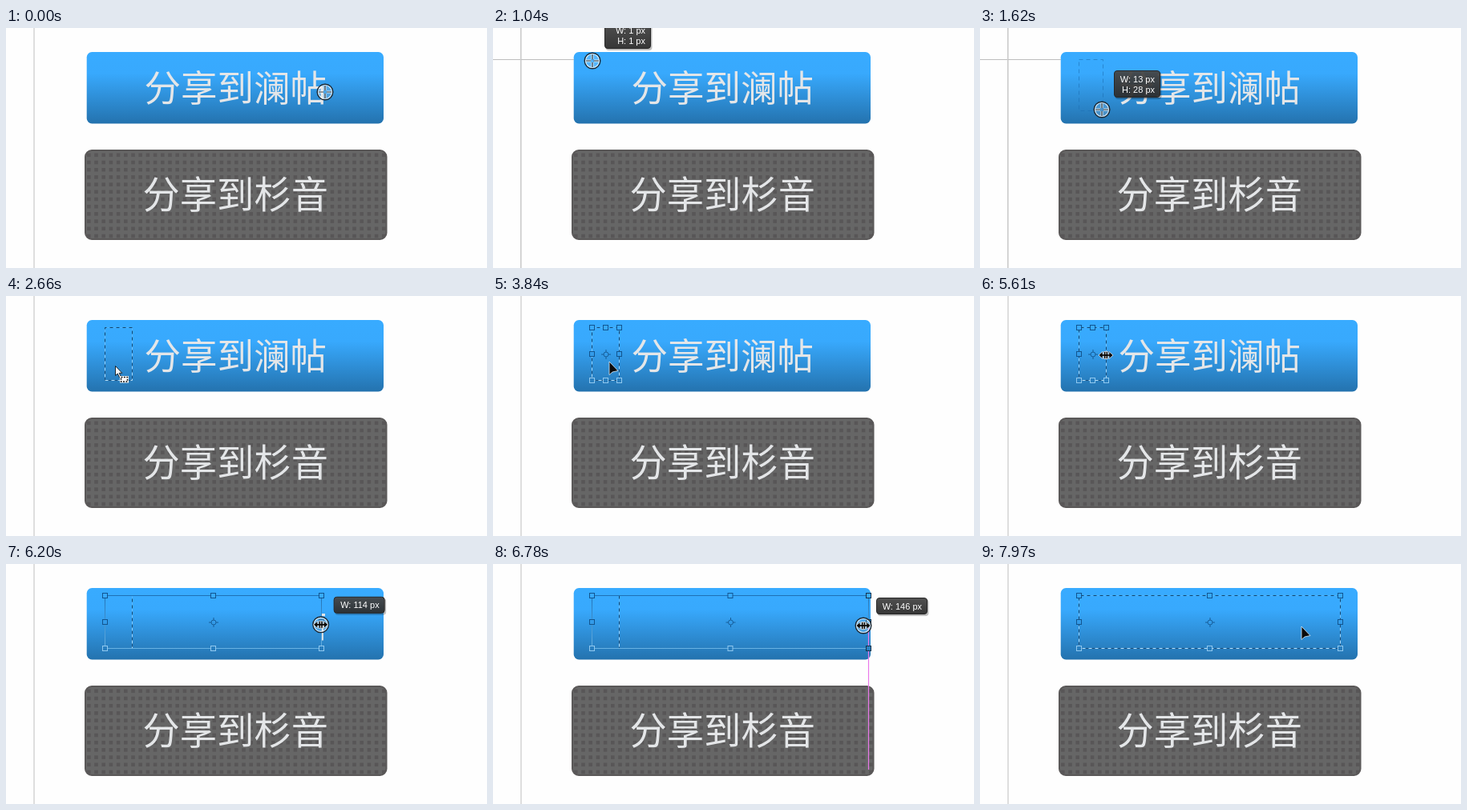
An HTML page for the animation above (8 s loop, 600 px wide and 300 px high).

```html
<!DOCTYPE html>
<html lang="zh">
<head>
<meta charset="utf-8">
<title>Button edit</title>
<style>
html, body { margin: 0; width: 100%; height: 100%; overflow: hidden; background: #fefefe; }
svg { display: block; width: 600px; height: 300px; }
.label { font-family: "Noto Sans CJK SC", "Noto Sans CJK", sans-serif; fill: #e4e6e8; }
.tip { font: 11px "Liberation Sans", Arial, sans-serif; fill: #fff; }
</style>
</head>
<body>
<svg viewBox="0 0 600 300" xmlns="http://www.w3.org/2000/svg">
  <defs>
    <linearGradient id="blue" gradientUnits="userSpaceOnUse" x1="0" y1="30" x2="0" y2="119">
      <stop offset="0" stop-color="#38abff"/>
      <stop offset=".3" stop-color="#38a9fd"/>
      <stop offset="1" stop-color="#2473af"/>
    </linearGradient>
    <linearGradient id="antDark" gradientUnits="userSpaceOnUse" x1="0" y1="39" x2="0" y2="106">
      <stop offset="0" stop-color="#14466f"/>
      <stop offset="1" stop-color="#1d507c"/>
    </linearGradient>
    <linearGradient id="antLight" gradientUnits="userSpaceOnUse" x1="0" y1="39" x2="0" y2="106">
      <stop offset="0" stop-color="#4fb3fb"/>
      <stop offset="1" stop-color="#b5dffa"/>
    </linearGradient>
    <linearGradient id="edge" gradientUnits="userSpaceOnUse" x1="0" y1="39" x2="0" y2="106">
      <stop offset="0" stop-color="#1f70b4"/>
      <stop offset="1" stop-color="#69b3e4"/>
    </linearGradient>
    <linearGradient id="tipFill" x1="0" y1="0" x2="0" y2="1">
      <stop offset="0" stop-color="#484848"/>
      <stop offset="1" stop-color="#2c2c2c"/>
    </linearGradient>
    <pattern id="dots" patternUnits="userSpaceOnUse" x="101" y="156.5" width="9.2" height="9.2">
      <rect width="9.2" height="9.2" fill="#666"/>
      <rect width="4.6" height="4.6" fill="#585657"/>
    </pattern>
  </defs>
  <rect width="600" height="300" fill="#fefefe"/>
  <rect x="34" width="2" height="300" fill="#dedede"/>
  <rect x="100.7" y="30" width="370.3" height="89.5" rx="6.5" fill="url(#blue)"/>
  <text class="label" x="172.5" y="91.5" font-size="45.5">分享到澜帖</text>
  <rect x="99" y="153" width="375.5" height="111" rx="8" fill="url(#dots)" stroke="#5a5858" stroke-width="2"/>
  <text class="label" x="170.5" y="225" font-size="46.3">分享到杉音</text>
  <g id="live"></g>
</svg>
<script>
const LOOP = 8000, STEP = 147.4;
const L = 123.5, T = 39.5, B = 105.5, SEL_R = 157.5;
const live = document.getElementById('live');

// pointer path: step, x, y
const PATH = [
  [0, 398, 80], [5, 124, 43], [7, 124, 41], [11, 152, 102], [14, 156, 104],
  [15, 156, 104], [18, 136, 87], [22, 136, 87], [26, 145, 82], [30, 157, 74],
  [38, 157, 74], [43, 420, 76], [46, 462, 77], [47, 462, 77], [49, 454, 77],
  [50, 454, 77], [54, 401, 78]
];

function pointer(k) {
  let i = 0;
  while (i < PATH.length - 2 && PATH[i + 1][0] <= k) i++;
  const [k0, x0, y0] = PATH[i], [k1, x1, y1] = PATH[i + 1];
  const u = Math.min(1, (k - k0) / (k1 - k0)), e = u * u * (3 - 2 * u);
  return [x0 + (x1 - x0) * e, y0 + (y1 - y0) * e];
}

const line = (d, stroke, w = 1, more = '') =>
  `<path d="${d}" fill="none" stroke="${stroke}" stroke-width="${w}" ${more}/>`;
const box = (r, b) => `M${L} ${T}H${r}V${b}H${L}Z`;
const at = (x, y, s) => `<g transform="translate(${x} ${y})">${s}</g>`;

function ants(r, b, k) {
  const d = box(r, b);
  return line(d, 'url(#antLight)') +
    line(d, 'url(#antDark)', 1, `stroke-dasharray="4 4" stroke-dashoffset="${-(k * 3 % 8)}"`);
}

function handles(r) {
  const mx = (L + r) / 2, my = (T + B) / 2;
  let s = '';
  for (const x of [L, mx, r]) for (const y of [T, my, B]) {
    if (x === mx && y === my) continue;
    const c = x > 465 ? '#17324a' : y === B ? '#8fc8ef' : '#12558f';
    s += `<rect x="${x - 3}" y="${y - 3}" width="6" height="6" fill="url(#blue)" stroke="${c}"/>`;
  }
  return s + at(mx + .5, my + .5, '<circle r="3" fill="none" stroke="#175e99"/>' +
    line('M-6 0H-3M3 0H6M0 -6V-3M0 3V6', '#175e99'));
}

function tip(x, y, w, rows) {
  const h = rows.length * 13 + 8;
  return at(x, y,
    `<rect x="1.5" y="2" width="${w}" height="${h}" rx="4" fill="#000" opacity=".25"/>` +
    `<rect x=".5" y=".5" width="${w - 1}" height="${h - 1}" rx="3.5" fill="url(#tipFill)" fill-opacity=".93" stroke="#262626"/>` +
    rows.map((t, i) => `<text class="tip" x="${w - 7}" y="${14.5 + i * 13}" text-anchor="end">${t}</text>`).join(''));
}

const ring = '<circle r="9.8" fill="#fff" fill-opacity=".15" stroke="#1c2730" stroke-width="1.4"/>' +
  '<circle r="8.5" fill="none" stroke="#fff" stroke-opacity=".75" stroke-width="1.2"/>';
const arms = 'M-8 0H-2M2 0H8M0 -8V-2M0 2V8';
const cross = ring + line(arms, '#fff', 3, 'opacity=".8"') + line(arms, '#24323c', 1.2);
const whiteArrow = '<path d="M.5 .5V12.5L3.2 10L5.4 14.5L7.2 13.6L5.2 9.3H8.8Z" fill="#f4f8fb" stroke="#1b2730"/>' +
  '<rect x="6" y="13" width="11" height="8.5" fill="#fff"/>' +
  line('M7.5 14.5h8v5.5h-8z', '#111', 1.5, 'stroke-dasharray="2 1.4"');
const blackArrow = '<path d="M0 0V16.5L4 13L11 11.5Z" fill="#0a0a0a" stroke="#dcecf8" stroke-width=".8"/>';
const resize = '<path d="M-9 0L-4 -4.5V-1.3H-2.5V-4.5H2.5V-1.3H4V-4.5L9 0L4 4.5V1.3H2.5V4.5H-2.5V1.3H-4V4.5Z" ' +
  'fill="#0a0a0a" stroke="#fff" stroke-width=".7"/>' + line('M0 -4V-1M0 1V4', '#fff');

function marquee(k, x, y) {
  if (k < 7) return '';
  if (k > 14) return ants(SEL_R, B, k);
  const r = x + 1.5, b = y + 1.5;
  return line('M0 39.5H101', '#bdbdbd') + line('M34.5 0V300', '#cdcdcd') +
    line(box(r, b), '#1d6fb2', 1, 'stroke-dasharray="5 4" opacity=".6"') +
    tip(x + 15, y - 49, 58, [`W: ${Math.round((r - L) / 2.36)} px`, `H: ${Math.round((b - T) / 2.3)} px`]);
}

function transform(k, x, y) {
  const drag = k > 38 && k < 51;
  const snap = drag && k < 48 && x > 455;
  let r = SEL_R;
  if (k > 50) r = 449.5;
  else if (snap) r = 468.5;
  else if (drag) r = Math.round(k > 47 ? x - 4 : x) + .5;
  let s = '';
  if (k > 38) s += `<rect x="${L}" y="${T}" width="${r - L}" height="${B - T}" fill="url(#blue)"/>`;
  s += ants(k > 50 ? r : SEL_R, B, k);
  if (drag) s += line(box(r, B), 'url(#edge)');
  if (snap) s += line('M468.5 80V257', '#ea78ea', 1.2);
  s += handles(r);
  if (drag) {
    const w = Math.round((r - L) / 2.36);
    s += tip(x + 16, y - 35, w > 99 ? 64 : 58, [`W: ${w} px`]);
  }
  return s;
}

function cursor(k) {
  if (k < 16) return cross;
  if (k < 22) return whiteArrow;
  if (k < 29 || k > 50) return blackArrow;
  return k > 38 ? ring + resize : resize;
}

function draw(k) {
  const [x, y] = pointer(k);
  live.innerHTML = (k < 22 ? marquee(k, x, y) : transform(k, x, y)) + at(x, y, cursor(k));
}

const start = performance.now();
let last = -1;
function tick(now) {
  const t = Math.max(0, now - start) % LOOP;
  const k = Math.min(54, Math.floor((t + 8) / STEP));
  if (k !== last) draw(last = k);
  requestAnimationFrame(tick);
}
draw(0);
requestAnimationFrame(tick);
</script>
</body>
</html>
```
